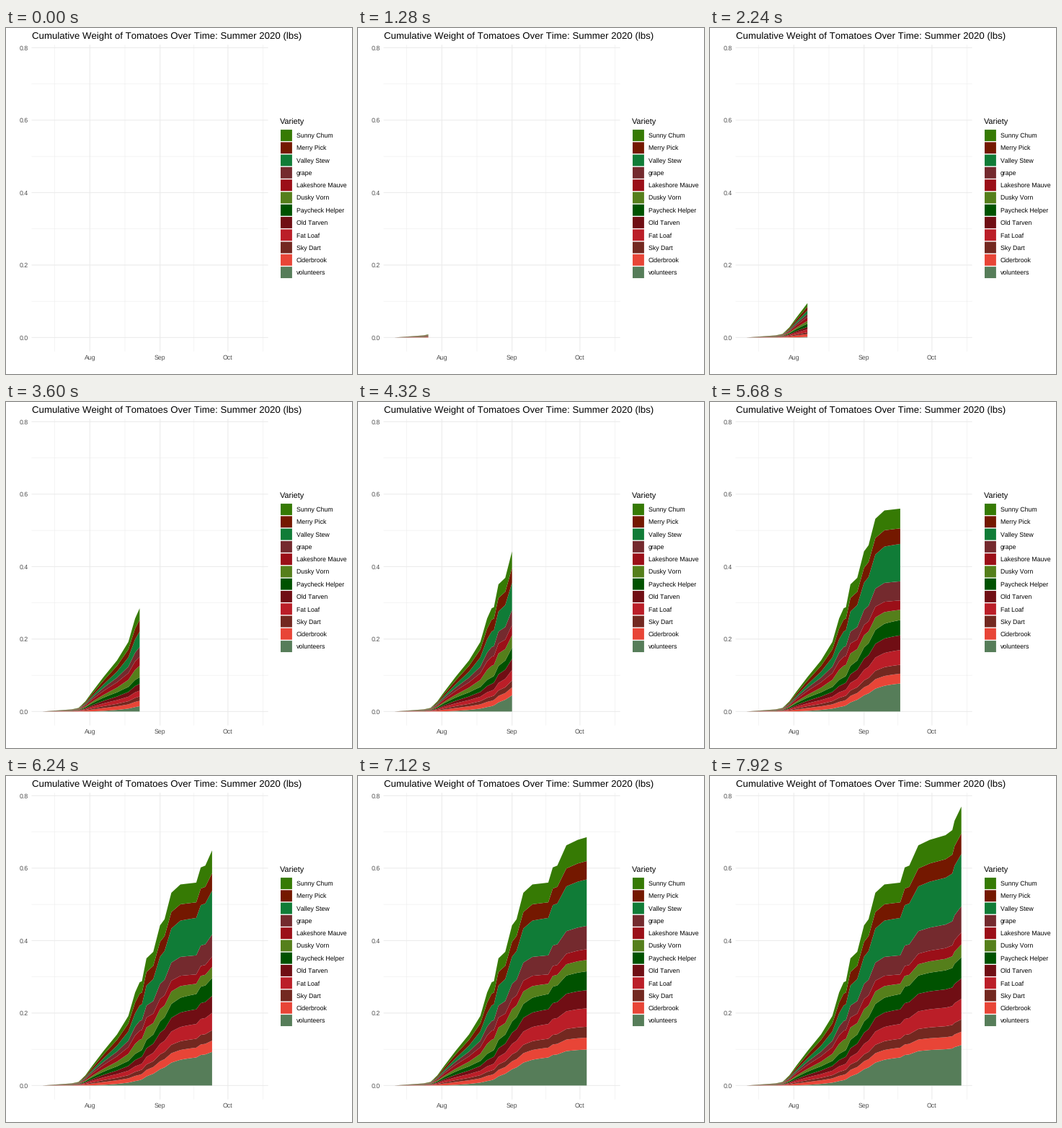
A matplotlib script that plays this animation: 480x480 px, repeating every 8 s.

```python
import numpy as np
import matplotlib.pyplot as plt
from matplotlib.animation import FuncAnimation
from matplotlib.patches import Polygon, Rectangle

plt.rcParams["font.family"] = "Liberation Sans"
plt.rcParams["text.hinting"] = "none"
plt.rcParams["text.kerning_factor"] = 6  # plain advances, no kerning

SIZE, FRAMES, STEP_MS = 480, 100, 80
X0, DAY_W, LAST_DAY = 50.4, 3.14, 95
Y0, UNIT_H = 429.4, 502.6
LEFT, RIGHT, TOP, BOTTOM = 35.5, 363.6, 23.3, 448.7
GREY = "#4d4d4d"

# Name, colour and percent of the harvest: early, mid-season, at the end.
VARIETIES = [
    ("Sunny Chum", "#367a04", (10, 11, 9.6)),
    ("Merry Pick", "#741800", (11, 11.5, 7.4)),
    ("Valley Stew", "#107c37", (8, 15, 18.7)),
    ("grape", "#742a2e", (9, 9.4, 9.4)),
    ("Lakeshore Mauve", "#9b0f18", (12, 8.8, 4.3)),
    ("Dusky Vorn", "#557f1b", (7, 11.2, 4.6)),
    ("Paycheck Helper", "#005200", (10, 6.3, 7.6)),
    ("Old Tarven", "#700e14", (7.5, 6.6, 7.3)),
    ("Fat Loaf", "#bb1e28", (9, 5.6, 7.4)),
    ("Sky Dart", "#732820", (5.5, 4.2, 4.4)),
    ("Ciderbrook", "#e84537", (9, 5.2, 4.8)),
    ("volunteers", "#567d59", (1, 5.2, 14.5)),
]
EARLY_DAY, MID_DAY = 22, 43

# Bends of the total: day and thousandths of a unit.
BENDS = [(0, 0), (13, 6), (16, 10), (19, 28), (22, 54), (27, 95), (33, 141),
         (38, 192), (41, 257), (43, 285), (44, 288), (46, 351), (49, 369),
         (52, 442), (54, 459), (57, 532), (61, 555), (68, 560), (70, 602),
         (72, 607), (76, 663), (81, 678), (88, 691), (91, 705), (92, 731),
         (95, 770)]


def x_of(day):
    return X0 + DAY_W * day


def y_of(value):
    return Y0 - UNIT_H * value


def share(days, early, mid, late):
    """Straight drift up to mid-season, then an ease-out to the end."""
    drift = np.clip((days - EARLY_DAY) / (MID_DAY - EARLY_DAY), 0, 1)
    rest = np.clip((days - MID_DAY) / (LAST_DAY - MID_DAY), 0, 1)
    ease = 1 - (1 - rest) ** 4
    return early + (mid - early) * drift + (late - mid) * ease


def stack_borders(days):
    """Values of the layer borders, from the ground to the top."""
    parts = np.array([share(days, *mix) for *_, mix in reversed(VARIETIES)])
    total = np.interp(days, *zip(*BENDS)) / 1000
    sums = np.cumsum(parts, axis=0)
    return np.vstack([np.zeros(len(days)), total * sums / sums[-1]])


fig = plt.figure(figsize=(SIZE / 72, SIZE / 72), dpi=72, facecolor="white")
ax = fig.add_axes([0, 0, 1, 1])
ax.set_xlim(0, SIZE)
ax.set_ylim(SIZE, 0)
ax.axis("off")


def label(x, y, text, size=8.8, color="black", ha="left"):
    ax.text(x, y, text, fontsize=size, color=color, ha=ha, va="baseline")


def grid_line(xs, ys, width):
    ax.plot(xs, ys, color="#ebebeb", lw=width, snap=False,
            solid_capstyle="butt", zorder=1)


def draw_grid():
    for day in (5.5, 36.5, 67, 97.5):
        grid_line([x_of(day)] * 2, [TOP, BOTTOM], 0.53)
    for value in (0.1, 0.3, 0.5, 0.7):
        grid_line([LEFT, RIGHT], [y_of(value)] * 2, 0.53)
    for day, month in ((21, "Aug"), (52, "Sep"), (82, "Oct")):
        grid_line([x_of(day)] * 2, [TOP, BOTTOM], 1.07)
        label(x_of(day), 460, month, color=GREY, ha="center")
    for value in (0, 0.2, 0.4, 0.6, 0.8):
        grid_line([LEFT, RIGHT], [y_of(value)] * 2, 1.07)
        label(30.6, y_of(value) + 3.1, f"{value:.1f}", color=GREY, ha="right")


def draw_legend():
    label(380, 134, "Variety", size=11)
    for i, (name, color, _) in enumerate(VARIETIES):
        mid = 149 + 17.28 * i
        ax.add_patch(Rectangle((381, mid - 7.95), 15.9, 15.9, fc=color, lw=0,
                               snap=False))
        label(403, mid + 3.2, name)


draw_grid()
draw_legend()
label(LEFT, 15, "Cumulative Weight of Tomatoes Over Time: Summer 2020 (lbs)",
      size=13.2)

layers = [ax.add_patch(Polygon([(X0, Y0)] * 3, fc=color, lw=0, snap=False,
                               zorder=2))
          for _, color, _ in reversed(VARIETIES)]


def update(frame):
    # The reveal moves on by whole days.
    today = round(LAST_DAY * frame / (FRAMES - 1))
    days = np.arange(today + 1)
    xs = x_of(days)
    ys = y_of(stack_borders(days))
    for layer, low, high in zip(layers, ys, ys[1:]):
        layer.set_visible(today > 0)
        layer.set_xy(np.column_stack([np.append(xs, xs[::-1]),
                                      np.append(low, high[::-1])]))
    return layers


anim = FuncAnimation(fig, update, frames=FRAMES, interval=STEP_MS,
                     init_func=lambda: update(0), repeat=True, repeat_delay=0)
plt.show()
```
